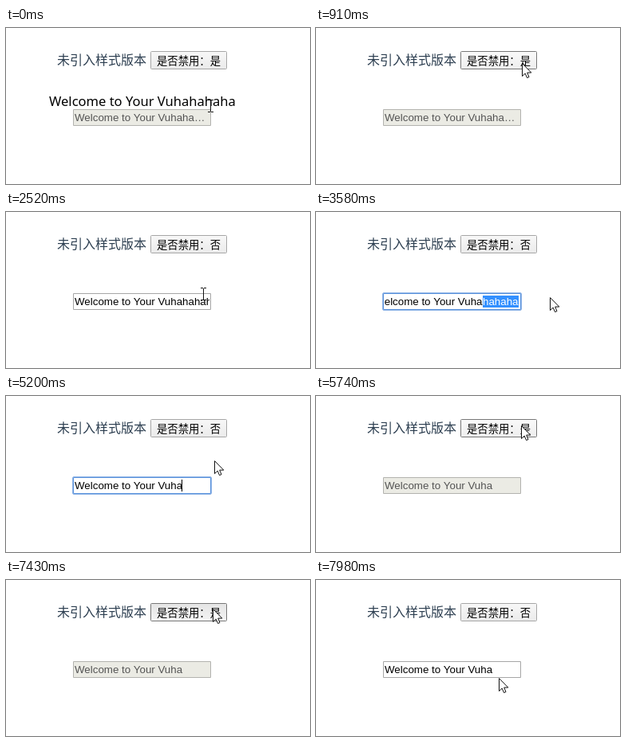
Animation, 381 px wide and 196 px high, one loop 8000 ms. Source, as an HTML page with a canvas:

```html
<!DOCTYPE html>
<html lang="zh-CN">
<head>
<meta charset="utf-8">
<title>Input toggle</title>
<style>
html, body { margin: 0; width: 100%; height: 100%; overflow: hidden; background: #fff; }
canvas { display: block; }
</style>
</head>
<body>
<canvas id="stage" width="381" height="196"></canvas>
<script>
const ctx = document.getElementById('stage').getContext('2d');
const LOOP = 8000;
const CJK = '"Noto Sans CJK SC", "Noto Sans CJK", sans-serif';
const FIELD_FONT = '13.333px "Liberation Sans", Arial, sans-serif';
const SHORT = 'Welcome to Your Vuha';
const LONG = SHORT + 'hahaha';

// [time, pointer kind, left, top]
const pointerSteps = [
  [0, 'beam', 253, 90], [130, 'beam', 257, 81], [270, 'arrow', 258, 72], [400, 'arrow', 260, 56],
  [550, 'arrow', 259, 50], [670, 'arrow', 258, 46], [910, 'arrow', 258, 44],
  [2140, 'arrow', 257, 53], [2270, 'arrow', 255, 66], [2400, 'arrow', 250, 84], [2520, 'beam', 244, 95],
  [2670, 'beam', 232, 102], [2790, 'beam', 221, 107], [3310, 'arrow', 267, 109],
  [3460, 'arrow', 284, 108], [3580, 'arrow', 293, 107], [4650, 'arrow', 284, 107],
  [5050, 'arrow', 273, 109], [5200, 'arrow', 261, 81], [5340, 'arrow', 258, 60], [5470, 'arrow', 257, 37],
  [5890, 'arrow', 256, 58], [6010, 'arrow', 254, 83], [6160, 'arrow', 246, 92], [6290, 'arrow', 235, 101],
  [6410, 'arrow', 226, 110], [6530, 'arrow', 219, 116], [6780, 'arrow', 222, 103],
  [6940, 'arrow', 241, 70], [7060, 'arrow', 258, 40], [7430, 'arrow', 259, 36],
  [7830, 'beam', 230, 103], [7980, 'arrow', 229, 123]
];
const buttonSteps = [
  [0, 'idle'], [550, 'hover'], [1590, 'pressed'], [1710, 'hover'], [2140, 'idle'],
  [5470, 'hover'], [5890, 'idle'], [7060, 'hover'], [7430, 'pressed'], [7560, 'idle']
];
const buttonLooks = {
  idle: ['#f8f8f8', '#eaeaea', '#a6a6a6'],
  hover: ['#fafafa', '#ededed', '#777777'],
  pressed: ['#e4e4e4', '#f4f4f4', '#777777']
};

const within = (t, from, to) => t >= from && t < to;
const stepAt = (steps, t) => steps.filter(s => s[0] <= t).pop();

function text(str, x, y, font, color) {
  ctx.font = font;
  ctx.fillStyle = color;
  ctx.fillText(str, x, y);
}

function box(x, y, w, h, fill, border, radius = 0) {
  ctx.beginPath();
  ctx.roundRect(x + 0.5, y + 0.5, w - 1, h - 1, radius);
  ctx.fillStyle = fill;
  ctx.fill();
  ctx.lineWidth = 1;
  ctx.strokeStyle = border;
  ctx.stroke();
}

function drawButton(t, disabled) {
  const [top, bottom, border] = buttonLooks[stepAt(buttonSteps, t)[1]];
  const fill = ctx.createLinearGradient(0, 29, 0, 52);
  fill.addColorStop(0, top);
  fill.addColorStop(1, bottom);
  box(181, 29, 96, 23, fill, border, 1);
  text('是否禁用：' + (disabled ? '是' : '否'), 189, 45.5, '350 13.333px ' + CJK, '#000');
}

function drawField(t, disabled) {
  const focused = within(t, 3190, 5620);
  const selected = within(t, 3310, 4800);
  const value = t < 4800 ? LONG : SHORT;

  if (focused) {
    box(83, 101, 175, 23, '#fff', '#8fb4e6', 1.5);
    box(84, 102, 173, 21, '#fff', '#5b93dc');
  } else {
    box(84, 102, 173, 21, disabled ? '#ebebe4' : '#fff', disabled ? '#b2b2ae' : '#a6a6a6');
  }

  ctx.save();
  ctx.beginPath();
  ctx.rect(86, 104, 169, 17);
  ctx.clip();
  ctx.font = FIELD_FONT;
  const headWidth = ctx.measureText(SHORT).width;
  if (selected) {
    const split = Math.floor(254 - ctx.measureText('hahaha').width);
    text(SHORT, split - headWidth - 0.5, 117, FIELD_FONT, '#000');
    ctx.fillStyle = '#3390ff';
    ctx.fillRect(split, 105, 254 - split, 15);
    text('hahaha', split, 117, FIELD_FONT, '#fff');
  } else {
    const shown = disabled && value === LONG ? SHORT + 'ha…' : value;
    text(shown, 86, 117, FIELD_FONT, disabled ? '#545454' : '#000');
    if (focused && t < 5340) ctx.fillRect(Math.round(86 + headWidth) - 1, 105, 1, 15);
  }
  ctx.restore();
}

function drawArrow(x, y) {
  const points = [[0, 0], [0, 16], [3.7, 12.5], [6, 18], [8.5, 17], [6.2, 11.5], [11.3, 11.5]];
  ctx.beginPath();
  points.forEach(([px, py]) => ctx.lineTo(x + 0.5 + px, y + 0.6 + py));
  ctx.closePath();
  ctx.fillStyle = '#fff';
  ctx.fill();
  ctx.lineWidth = 1;
  ctx.strokeStyle = '#111';
  ctx.stroke();
}

function drawBeam(x, y) {
  ctx.fillStyle = '#111';
  ctx.fillRect(x + 3, y + 1, 1, 14);
  for (const row of [y, y + 15]) {
    ctx.fillRect(x, row, 3, 1);
    ctx.fillRect(x + 4, row, 3, 1);
  }
}

function draw(t) {
  const disabled = t < 1710 || within(t, 5740, 7710);
  ctx.fillStyle = '#fff';
  ctx.fillRect(0, 0, 381, 196);
  text('未引入样式版本', 64, 46, '350 16px ' + CJK, '#2c3e50');
  drawButton(t, disabled);
  drawField(t, disabled);
  if (t < 550) text(LONG, 54, 98, '16.55px "Noto Sans", "Open Sans", sans-serif', '#000');

  const [, kind, x, y] = stepAt(pointerSteps, t);
  (kind === 'beam' ? drawBeam : drawArrow)(x, y);
}

const start = performance.now();
function tick() {
  draw((performance.now() - start) % LOOP);
  requestAnimationFrame(tick);
}
tick();
</script>
</body>
</html>
```
